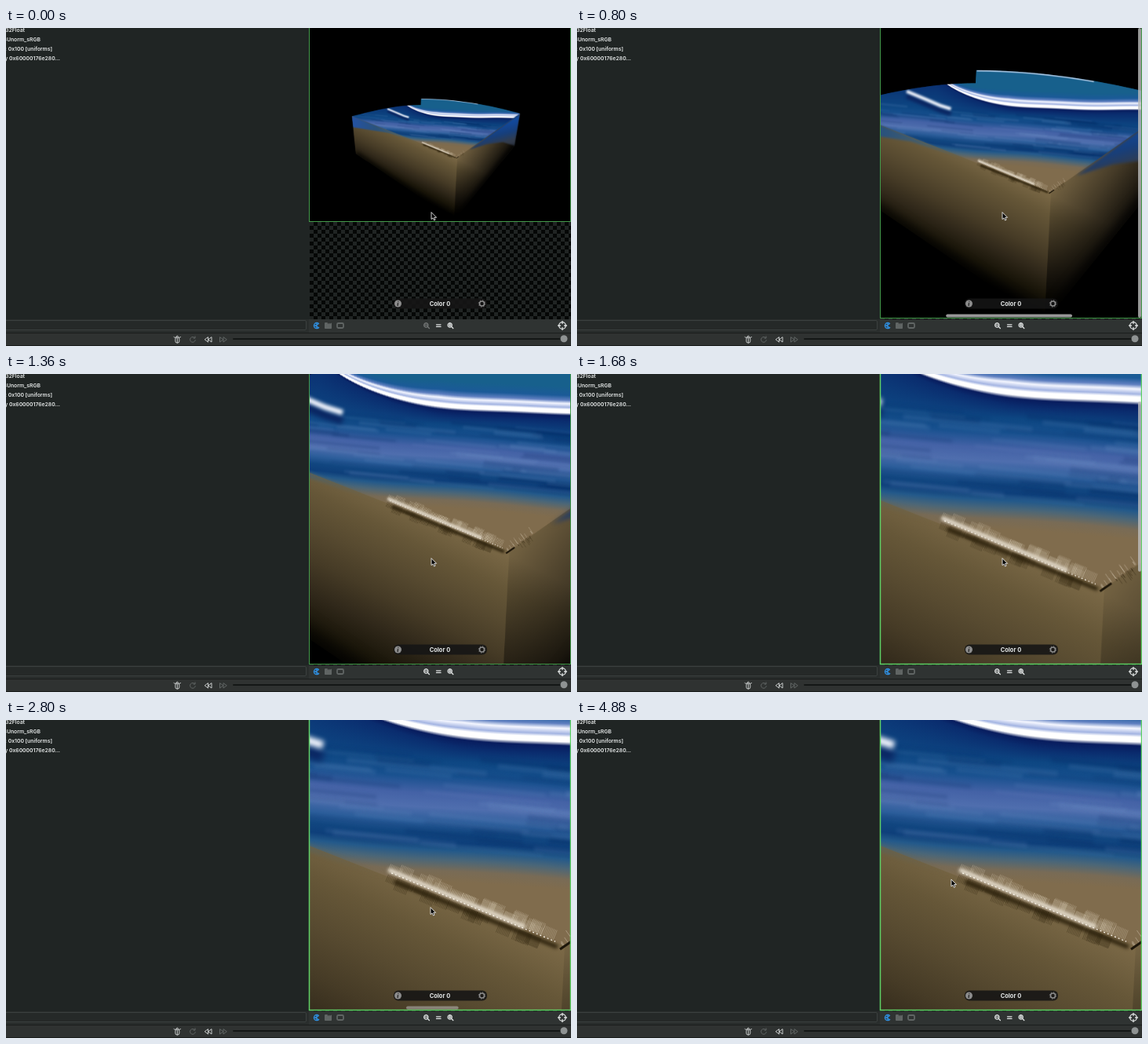
An HTML page with a canvas for the animation above (4.96 s loop, 720 by 405 pixels).

```html
<!DOCTYPE html>
<html>
<head>
<meta charset="utf-8">
<style>
html, body { margin: 0; width: 100%; height: 100%; overflow: hidden; background: #202524; }
canvas, svg { position: absolute; left: 0; top: 0; }
text { font-family: Inter, Roboto, sans-serif; fill: #e4e7e7; font-weight: 600; }
</style>
</head>
<body>
<canvas id="view" width="720" height="405"></canvas>
<svg width="720" height="405" fill="none" stroke-linecap="round" stroke-linejoin="round">
  <g font-size="6.8" text-anchor="end">
    <text x="24" y="4.6">32Float</text>
    <text x="44" y="16.8">8Unorm_sRGB</text>
    <text x="59" y="29">: 0x100 [uniforms]</text>
    <text x="69" y="41.2">y 0x60000176e280...</text>
  </g>
  <path d="M0 371H386V388H0z" fill="#292d2c"/>
  <path d="M386 371H720V388H386z" fill="#2f3332"/>
  <rect x="-5" y="372.5" width="387.5" height="12" rx="1.5" fill="#252928" stroke="#3b403f"/>
  <path d="M0 388H720V405H0z" fill="#2f3231"/>
  <path d="M0 388.5H720M0 404.5H720" stroke="#1a1d1c"/>
  <path d="M290 396H707" stroke="#141716" stroke-width="2"/>
  <circle cx="711" cy="395.7" r="4.5" fill="#8f9393"/>
  <g stroke="#c8cbcb">
    <rect x="215.8" y="394" width="5" height="7" rx="2.2"/>
    <path d="M216 394l2.2-2 2.3 2M218.300 395v6M214 393.500l1.500 1M222.500 393.500l-1.500 1"/>
    <path d="M257.5 394v6l-4-3zM262 394v6l-4-3z"/>
  </g>
  <g stroke="#dfe2e2" stroke-width="1.3">
    <path d="M548.5 377.8h5.5M548.5 380.4h5.5"/>
    <path id="minus" d="M537.4 380.5l2 2M534.2 378.300h2.200M532.700 378.300a2.600 2.600 0 1 1 0 .1"/>
    <path d="M567.8 380.500l2 2M564.600 378.300h2.200M565.700 377.200v2.200M563.100 378.300a2.600 2.600 0 1 1 0 .1"/>
    <circle cx="709" cy="379" r="4.300"/>
    <path d="M709 373.500v3M709 381.500v3M703.500 379h3M711.500 379h3"/>
  </g>
  <g stroke="#606564">
    <path d="M240.700 394.800a3.400 3.400 0 1 0 .6 2.800M241 392.800v2.200h-2.200"/>
    <path d="M272.500 394v6l4-3zM277 394v6l4-3z"/>
    <path d="M406.500 376v6.500h8V376l-2.500 2v-2l-2.500 2v-2z" fill="#606564"/>
    <rect x="422" y="376" width="8" height="6" rx="1.500" stroke-width="1.800"/>
  </g>
  <path d="M398.500 376.500a3.600 3.600 0 1 0 .2 5M397.500 377.500l-4 1.500 4 2M396 375.500v7" stroke="#2f8fe0" stroke-width="1.300"/>
  <rect x="494" y="344.500" width="119" height="13" rx="6" fill="#151515" fill-opacity=".88"/>
  <text x="553" y="353.800" font-size="7.400" text-anchor="middle" style="font-weight:700">Color 0</text>
  <circle cx="499.500" cy="351" r="4.500" fill="#8c8c8c"/>
  <path d="M499.900 348.500v.1M499.500 350.500l-.4 3" stroke="#1c1c1c" stroke-width="1.200"/>
  <circle cx="606.500" cy="351" r="3" stroke="#8c8c8c" stroke-width="1.500"/>
  <circle cx="606.500" cy="351" r="4.200" stroke="#8c8c8c" stroke-dasharray="1.300 2" stroke-linecap="butt"/>
  <path id="cursor" d="M0 0V8.600L2 6.900 3.500 10 5 9.300 3.600 6.300H6.200z" fill="#000" stroke="#e8e8e8" stroke-width=".9"/>
</svg>
<script>
const LOOP = 4960, STEP = 80;
const LEFT = 387, RIGHT = 720, BOTTOM = 369, WIDTH = RIGHT - LEFT;
const view = document.getElementById('view').getContext('2d');
const cursor = document.getElementById('cursor');
const minus = document.getElementById('minus');

let seed = 7;
const random = () => (seed = seed * 16807 % 2147483647) / 2147483647;

// The block of sea and sand is painted once at full zoom; the camera only scales it.
const OX = 10, OY = 100;
const CORNER = [712, 288], WEST = [42, 25], EAST = [1112, 8];
const WEST_FOOT = [67, 263], FOOT = [692, 688], EAST_FOOT = [1077, 213];
const block = document.createElement('canvas');
block.width = 1130; block.height = 800;
const g = block.getContext('2d');
g.translate(-OX, OY);

function gradient(from, to, ...colors) {
  const fill = g.createLinearGradient(...from, ...to);
  colors.forEach((color, i) => fill.addColorStop(i / (colors.length - 1), color));
  return fill;
}
function trace(points) {
  g.beginPath();
  for (const p of points) g.lineTo(...p);
}
function area(fill, blur, ...points) {
  g.filter = `blur(${blur}px)`;
  g.fillStyle = fill;
  trace(points);
  g.fill();
}
function stroke(color, width, blur, ...points) {
  g.filter = blur ? `blur(${blur}px)` : 'none';
  g.strokeStyle = color;
  g.lineWidth = width;
  trace(points);
  g.stroke();
}

// Far outline: a swell on the left, then a step up and a long fall to the right.
const skyline = x => x < 482
  ? 25 - 72 * Math.sin((x - 42) / 440 * Math.PI / 2)
  : 95 * ((x - 482) / 630) ** 1.9 - 87;
const crest = x => Math.max(-70, 34 - 34 * Math.exp((482 - x) / 110));

// Bands from the crest up and down, then bands of the flat water down to the sand.
const crestBands = [[-50, '#17608c'], [-33, '#1b5a98'], [-24, '#5f7fc0'], [-18, '#f4f6ff'],
  [-11, '#a3b4e2'], [-7, '#fff'], [-1, '#fff'], [4, '#081c5e'], [14, '#0a2c6e']];
const flatBands = [[52, '#0d4682'], [72, '#17508e'], [94, '#4462a6'], [112, '#4f6eae'], [130, '#2b5d9a'],
  [144, '#114680'], [156, '#0e3f7a'], [166, '#23598a'], [178, '#4a6678'], [192, '#786b56'], [206, '#806c4d']];

function paintSea() {
  g.filter = 'none';
  for (let x = WEST[0]; x < EAST[0]; x += 2) {
    const top = -90, height = 400, fill = g.createLinearGradient(0, top, 0, top + height);
    const swell = Math.min(1, Math.max(.3, (x - 250) / 330));
    const band = (y, color) => fill.addColorStop(Math.min(1, Math.max(0, (y - top) / height)), color);
    for (const [y, color] of crestBands) band(crest(x) + y * swell + Math.sin(x / 41), color);
    for (const [y, color] of flatBands) band(y + .08 * (x - 560) + 2 * Math.sin(x / 60), color);
    g.fillStyle = fill;
    g.fillRect(x, top, 2.5, height);
  }
  // Long soft streaks along the swell
  for (let i = 0; i < 110; i++) {
    const x = random() * 950, length = 60 + random() * 200, y = 45 + random() * 115 + .08 * (x - 560);
    stroke(i % 2 ? '#7fa0d024' : '#04245c30', 2 + random() * 5, 2, [x, y], [x + length, y + length * .1]);
  }
  const leftCrest = dy => [[268, -22 + dy], [330, 4 + dy], [372, 22 + dy], [404, 32 + dy]];
  stroke('#0a2460', 14, 5, ...leftCrest(15));
  stroke('#f6f8ff', 10, 3, ...leftCrest(0));
  const rim = [];
  for (let x = 484; x < 860; x += 20) rim.push([x, skyline(x) + 2]);
  stroke('#dce8ff', 3, 1, ...rim);
}

function paintWalls() {
  area(gradient([450, 165], [298, 469], '#7a6846', '#665738', '#574a30', '#463b26', '#30281a', '#191509', '#000'),
    .6, WEST, CORNER, EAST, EAST_FOOT, FOOT, WEST_FOOT);
  area(gradient([712, 280], [925, 430], '#0000000a', '#00000070', '#000000e8'),
    .6, CORNER, EAST, EAST_FOOT, FOOT);
  area(gradient([60, 0], [470, 0], '#2452a0', '#2a527c', '#4a6068', '#6d6247'),
    3, WEST, [480, 197], [380, 164], [280, 132], [30, 92]);
  area(gradient([900, 110], [930, 215], '#12489a', '#173f7c', '#333c4c'),
    4, [790, 238], EAST, EAST_FOOT, [1002, 190], [902, 203]);
  stroke('#000000b0', 34, 14, WEST_FOOT, FOOT);
  stroke('#000000b0', 34, 14, FOOT, EAST_FOOT);
}

// Foam along the cut edge: blocks of parallel hatching, pale above and dark below.
function paintFoam() {
  const along = (t, d) => [480 + 232 * t + .41 * d, 189 + 97 * t - d];
  stroke('#2c210c', 5, 2, along(.08, -9), along(.97, -6));
  stroke('#efe9dd', 5, 2, along(.03, 1), along(.78, 1));
  for (let i = 0; i < 45; i++) {
    const start = random() * .93, reach = 7 + random() * 9, pale = i % 9 < 5;
    for (let j = 0; j < 9; j++) {
      const t = start + j * .008;
      stroke(pale ? '#d6ccb670' : '#2e230f78', .8, 0, along(t, pale ? 0 : -4), along(t, pale ? reach : -reach - 4));
    }
  }
  for (let i = 0; i < 40; i++) {
    const x = 706 + random() * 50, y = 290 - (x - 706) * .7, d = (random() - .5) * 24;
    stroke(d < 0 ? '#d8ceb870' : '#2e230f70', 1, 0, [x, y], [x + d * .7, y + d]);
  }
  stroke('#1d160a', 3, .6, [706, 292], [722, 281]);
  g.setLineDash([2, 3]);
  stroke('#fffaf0', 1.2, 0, along(.05, -1), along(.95, -1));
  g.setLineDash([]);
}

const outline = [];
for (let x = WEST[0]; x <= EAST[0]; x += 2) outline.push([x, skyline(x)]);
trace([...outline, EAST_FOOT, FOOT, WEST_FOOT]);
g.clip();
paintSea();
paintWalls();
paintFoam();

// Piecewise linear point from rows of [time, x, y]
function track(t, rows) {
  const i = Math.max(1, rows.findIndex(row => row[0] >= t));
  const [t0, x0, y0] = rows[i - 1], [t1, x1, y1] = rows[i];
  const k = (t - t0) / (t1 - t0);
  return [x0 + (x1 - x0) * k, y0 + (y1 - y0) * k];
}
const cornerPath = [[0, 575, 165], [800, 604, 209], [1200, 626, 202], [1680, 672, 273],
  [2400, ...CORNER], [LOOP, ...CORNER]];
const pointerPath = [[0, 542, 235], [1680, 542, 235], [2800, 541, 239], [3920, 536, 231], [LOOP, 472, 201]];
const flash = (t, from, to) => Math.max(0, Math.min(1, (t - from) / 80, (to - t) / 240));

function bar(x, y, w, h, alpha) {
  view.fillStyle = `rgba(190,190,190,${alpha * .8})`;
  view.beginPath();
  view.roundRect(x, y, w, h, 2);
  view.fill();
}

function draw(t) {
  const [x, y] = track(t, cornerPath);
  const zoom = Math.min(1, .2 * Math.exp(t * .00091));
  const bottom = Math.min(BOTTOM, y + 405 * zoom);
  view.clearRect(0, 0, 720, 405);
  view.fillStyle = '#050706';
  view.fillRect(LEFT, 0, WIDTH, 371);
  view.fillStyle = '#202423';
  for (let row = 0; row < 25; row++)
    for (let col = row % 2; col < 68; col += 2) view.fillRect(LEFT + col * 5, 247 + row * 5, 5, 5);

  view.save();
  view.beginPath();
  view.rect(LEFT, 0, WIDTH, bottom);
  view.clip();
  view.fillStyle = '#000';
  view.fillRect(LEFT, 0, WIDTH, bottom);
  view.imageSmoothingQuality = 'high';
  view.translate(x, y);
  view.scale(zoom, zoom);
  view.drawImage(block, OX - CORNER[0], -OY - CORNER[1]);
  view.restore();

  const bright = t >= 1480;
  view.strokeStyle = bright ? '#5fd266' : '#439a4a';
  view.lineWidth = bright ? 1.5 : 1;
  view.strokeRect(LEFT - .5, -5, WIDTH, bottom + 5.5);

  const first = flash(t, 320, 1160);
  const tall = Math.min(BOTTOM, 200 / zoom);
  const start = LEFT + (LEFT - x + 940 * zoom) / (5 * zoom);
  bar(start, 364.5, WIDTH / (5 * zoom), 4, Math.max(first, flash(t, 1840, 2960)));
  bar(715, (BOTTOM - tall) * .23, 4, tall, Math.max(first, flash(t, 1400, 2300)));

  cursor.setAttribute('transform', `translate(${track(t, pointerPath)})`);
  minus.setAttribute('opacity', t < STEP ? .4 : 1);
}

function tick(now) {
  draw(Math.floor(now % LOOP / STEP) * STEP);
  requestAnimationFrame(tick);
}
requestAnimationFrame(tick);
</script>
</body>
</html>
```
